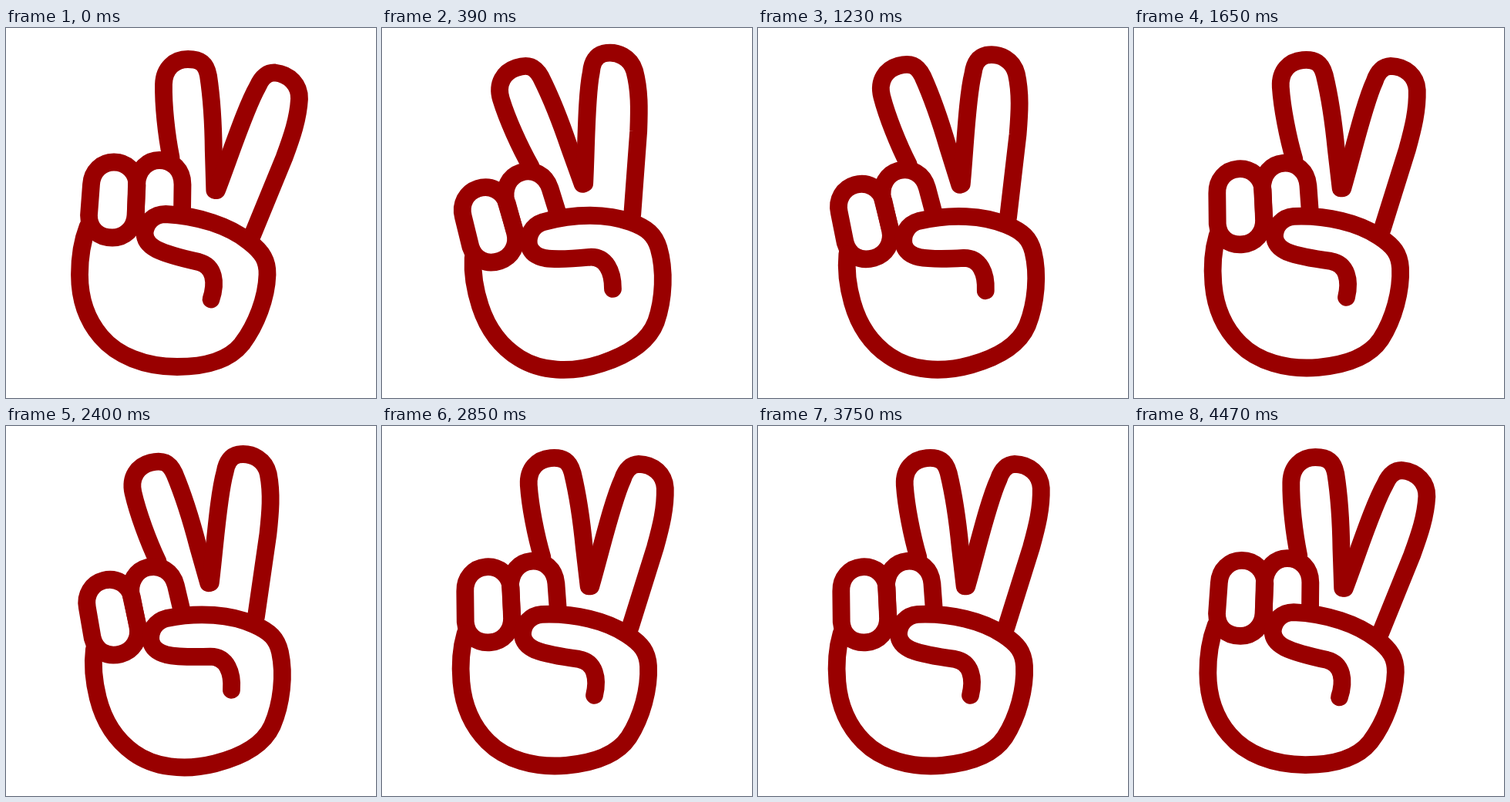
Recreate the animation shown at these times as an HTML page with a canvas. Size 480 px wide and 480 px high, loop 4.5 s.

```html
<!DOCTYPE html>
<html lang="en">
<head>
<meta charset="utf-8">
<title>Waving peace hand</title>
<style>
  html, body { margin: 0; width: 100%; height: 100%; overflow: hidden; background: #fff; }
  canvas { display: block; width: 480px; height: 480px; }
</style>
</head>
<body>
<canvas id="stage" width="480" height="480"></canvas>
<script>
const ctx = document.getElementById('stage').getContext('2d');

const SWING = 900;       // one sway there and back, ms
const STEP = 30;         // time per picture, ms
const MAX_ANGLE = 19 * Math.PI / 180;
const CENTER = 240;

const hand = [
  // index finger
  'M214 168 C208 138 204 100 204.5 73 C205 52 219 40.5 236 40.5 C252 40.5 259.5 46 262.5 62 C267.5 95 269 130 269.3 160 L270.8 210.5',
  // middle finger
  'M273.5 210.5 C291 165 310.5 104 326.5 76 C332 63 340 57.5 349 58 C368 60 381 74 380.5 92 C379 118 371 141 361 168 L320 268',
  // ring finger
  'M168.5 240 L169.5 202 C171 183 184 171.5 199 171.5 C216 171.5 229 184 229 203 L228.5 240',
  // little finger
  'M110.5 203 C111.5 186 124 174 140 174 C157 174 170 187 170 204 L168 243 C167 260 154 272 138 272 C119 272 107.5 260 107.5 243 Z',
  // thumb and palm
  'M266 352 C273 331 271 309 250 303.5 C225 298 207 293 195 287 C184 281 180 274 180 266 C181 252 192 241.5 207 241.5 C250 243.5 290 257 315 277 C333 291 339.5 302 339 320 C338 350 325 385 306 410 C290 430 262 439.5 222 439.5 C180 439.5 144 425 123 400 C103.5 377 95.5 350 95.5 320 C95.5 298 99 276 106 258'
].map(d => new Path2D(d));

const ease = x => x * x * (3 - 2 * x);

function swayAngle(time) {
  const phase = (time % SWING) / SWING;
  return -MAX_ANGLE * ease(1 - Math.abs(1 - 2 * phase));
}

function draw(time) {
  ctx.fillStyle = '#fff';
  ctx.fillRect(0, 0, 480, 480);
  ctx.save();
  ctx.translate(CENTER, CENTER);
  ctx.rotate(swayAngle(time));
  ctx.translate(-CENTER, -CENTER);
  ctx.strokeStyle = '#900';
  ctx.lineWidth = 22.8;
  ctx.lineCap = ctx.lineJoin = 'round';
  hand.forEach(path => ctx.stroke(path));
  ctx.restore();
}

const start = performance.now();

function tick() {
  const elapsed = performance.now() - start;
  draw(Math.floor(elapsed / STEP) * STEP);
  requestAnimationFrame(tick);
}

tick();
</script>
</body>
</html>
```
